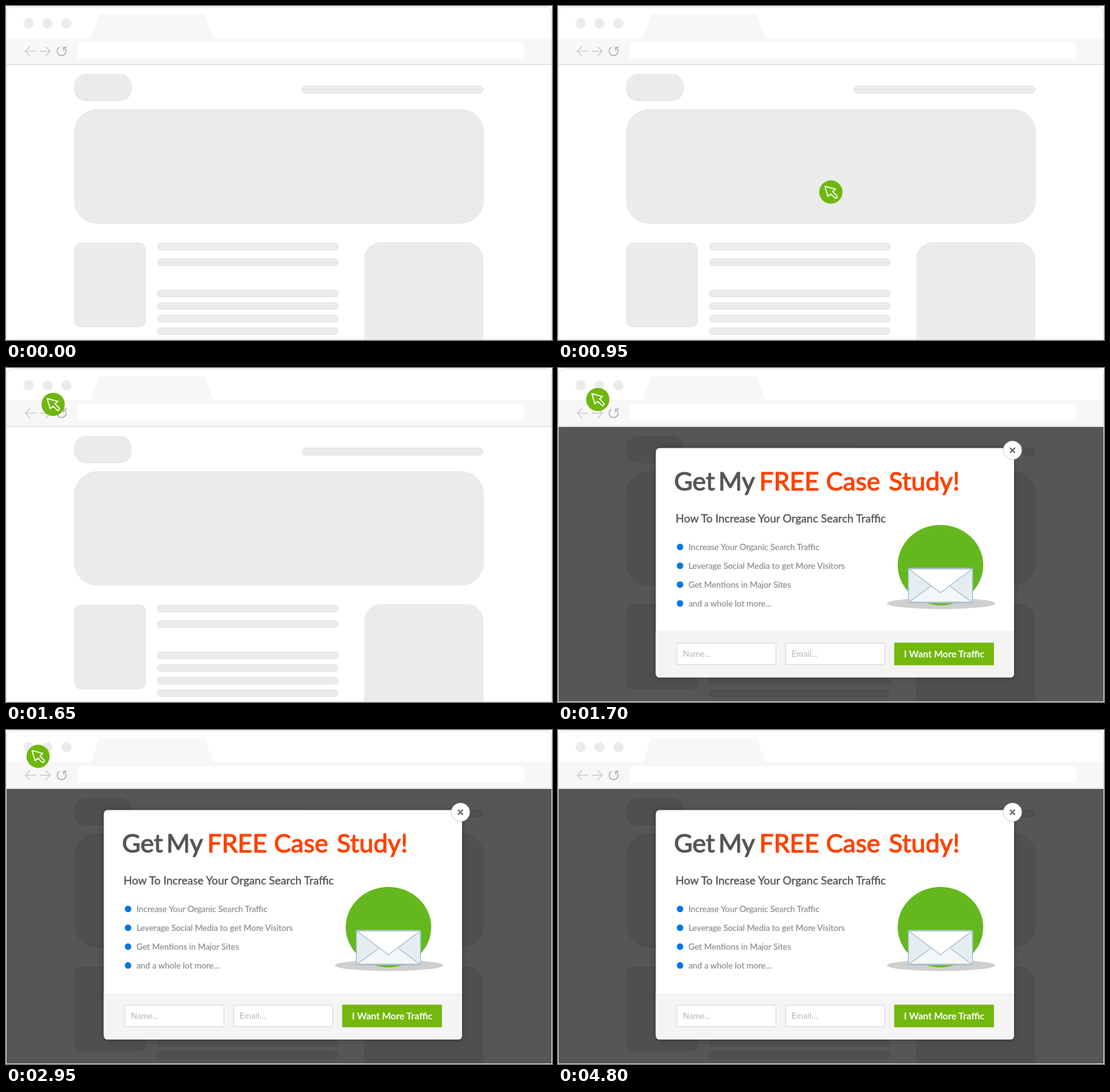
An HTML page for the animation above (5000 ms loop, 868 by 532 pixels).

```html
<!DOCTYPE html>
<html lang="en">
<head>
<meta charset="utf-8">
<title>Popup on exit</title>
<style>
html, body { margin: 0; width: 100%; height: 100%; overflow: hidden; background: #fff; }
svg { display: block; width: 868px; height: 532px; font-family: Lato, "Open Sans", sans-serif; }
.block { fill: #ebebeb; stroke: #e3e3e3; }
.bar { fill: #f7f7f7; }
.icon { fill: none; stroke: #ccc; stroke-width: 1.6; stroke-linecap: round; stroke-linejoin: round; }
.reload { stroke: #aaa; }
.card { fill: #fff; filter: drop-shadow(0 0 5px rgba(0, 0, 0, .3)); }
.title { font-size: 40.5px; fill: #555; stroke: #555; stroke-width: 1.2; }
.hot { fill: #ff4200; stroke: #ff4200; }
.sub { font-size: 17.6px; fill: #555; stroke: #555; stroke-width: .4; }
.item { font-size: 13.3px; fill: #8b8b8b; stroke: #8b8b8b; stroke-width: .2; }
.hint { font-size: 13.3px; fill: #b5b5b5; }
.field { fill: #fff; stroke: #d6d6d6; }
.cta { font-size: 14.9px; font-weight: bold; fill: #fff; }
</style>
</head>
<body>
<svg viewBox="0 0 868 532">
  <rect width="868" height="532" fill="#fff"/>
  <g id="page"></g>

  <g id="popup" visibility="hidden">
    <rect y="94" width="868" height="438" fill="#000" opacity=".663"/>
    <rect class="card" x="155.5" y="127.5" width="569.5" height="365.5" rx="6"/>
    <path d="M155.5 419H725V487a6 6 0 0 1-6 6H161.5a6 6 0 0 1-6-6z" fill="#f4f4f4"/>
    <circle cx="722.5" cy="131" r="14.7" fill="#fff" stroke="#ccc"/>
    <path d="M718.5 127l8 8m0-8l-8 8" stroke="#666" stroke-width="2.2"/>

    <text class="title" y="195">
      <tspan x="184.5">Get</tspan><tspan x="255">My</tspan>
      <tspan class="hot" x="320">FREE</tspan><tspan class="hot" x="426">Case</tspan>
      <tspan class="hot" x="526">Study!</tspan>
    </text>
    <text class="sub" x="187" y="245.5">How To Increase Your Organc Search Traffic</text>
    <g id="list"></g>

    <ellipse cx="609" cy="375" rx="86" ry="9" fill="#cfcfcf"/>
    <ellipse cx="608" cy="314" rx="68" ry="64" fill="#64b81e"/>
    <g stroke="#a9bfcb" stroke-width="1.5" stroke-linejoin="round">
      <rect x="557" y="319" width="102" height="55" rx="2" fill="#e4edf2"/>
      <path d="M558 373L600 342h16L658 373z" fill="#f3f7f9"/>
      <path d="M557.5 320L608 358L658.5 320z" fill="#fff"/>
    </g>

    <rect class="field" x="189" y="438.5" width="157.5" height="34"/>
    <rect class="field" x="362" y="438.5" width="157.5" height="34"/>
    <text class="hint" x="198.5" y="460">Name...</text>
    <text class="hint" x="371.5" y="460">Email...</text>
    <rect x="534.5" y="437.5" width="158.5" height="36" fill="#73b80d"/>
    <text class="cta" x="614" y="460.5" text-anchor="middle">I Want More Traffic</text>
  </g>

  <path class="bar" d="M135 51L147 17Q148.5 13 152 13H313Q316 13 317.5 17L330 51z"/>
  <rect class="bar" y="51" width="868" height="42"/>
  <rect y="92.5" width="868" height="1.5" fill="#dcdcdc"/>
  <rect x="114" y="58" width="710" height="25.5" fill="#fff"/>
  <g fill="#ebebeb">
    <circle cx="36" cy="27.5" r="8"/><circle cx="66" cy="27.5" r="8"/><circle cx="96" cy="27.5" r="8"/>
  </g>
  <path class="icon" d="M47 72H30.500m7.500-7.500L30.500 72l7.500 7.500M54 72H70.500m-7.500-7.500l7.500 7.500l-7.500 7.500"/>
  <path class="icon reload" d="M84.500 66.200A7 7 0 1 0 93.500 67.200M96 65.500h-4.500v5"/>
  <path d="M0 0H12Q.5 .5 .5 12V532H0zM868 0H856Q867.5 .5 867.5 12V532H868z" fill="#fff"/>
  <path d="M.5 531.5V11Q.5 1.5 10 1.5H858Q867.5 1.5 867.5 11V531.5z" fill="none" stroke="#dbdad7"/>

  <g id="cursor" opacity="0">
    <circle r="18.5" fill="#6fb70d"/>
    <path d="M-9.5 -9.300L7.500 -4.800L2.900 -.8L9.900 6.300Q10.500 9.300 7.200 9.900L-.3 2.900L-4.700 7z"
      fill="none" stroke="#fff" stroke-width="1.7" stroke-linejoin="round"/>
  </g>
</svg>
<script>
const $ = id => document.getElementById(id);

// x, y, width, height, radius
const blocks = [
  [109, 109, 90, 42, 18], [470.5, 127.5, 288, 11.5, 6], [109, 165, 650, 181, 36],
  [109, 377.5, 113, 133.5, 10], [570.5, 377, 187.5, 190, 25],
  ...[377, 402, 452, 472, 492, 512].map(y => [240.5, y + .5, 287.5, 11, 5.5])
];
$('page').innerHTML = blocks.map(([x, y, w, h, r]) =>
  `<rect class="block" x="${x}" y="${y}" width="${w}" height="${h}" rx="${r}"/>`).join('');

const items = ['Increase Your Organic Search Traffic', 'Leverage Social Media to get More Visitors',
  'Get Mentions in Major Sites', 'and a whole lot more...'];
$('list').innerHTML = items.map((s, i) =>
  `<circle cx="194" cy="${285 + 30 * i}" r="5.2" fill="#0078e0"/>
   <text class="item" x="207.5" y="${289.5 + 30 * i}">${s}</text>`).join('');

const LOOP = 5000, STEP = 50;
const ramp = (t, from, to) => Math.min(1, Math.max(0, (t - from) / (to - from)));
const easeInOut = u => u < .5 ? 4 * u ** 3 : 1 - 4 * (1 - u) ** 3;

function draw(now) {
  const t = Math.floor(now % LOOP / STEP) * STEP;
  const p = easeInOut(ramp(t, 900, 1900));
  $('cursor').setAttribute('transform', `translate(${434 - 383 * p} ${296.5 - 254.5 * p})`);
  $('cursor').setAttribute('opacity', ramp(t, 200, 650) - ramp(t, 4400, 4800));
  $('popup').setAttribute('visibility', t >= 1700 ? 'visible' : 'hidden');
}

let start;
function tick(now) {
  start ??= now;
  draw(now - start);
  requestAnimationFrame(tick);
}
requestAnimationFrame(tick);
</script>
</body>
</html>
```
